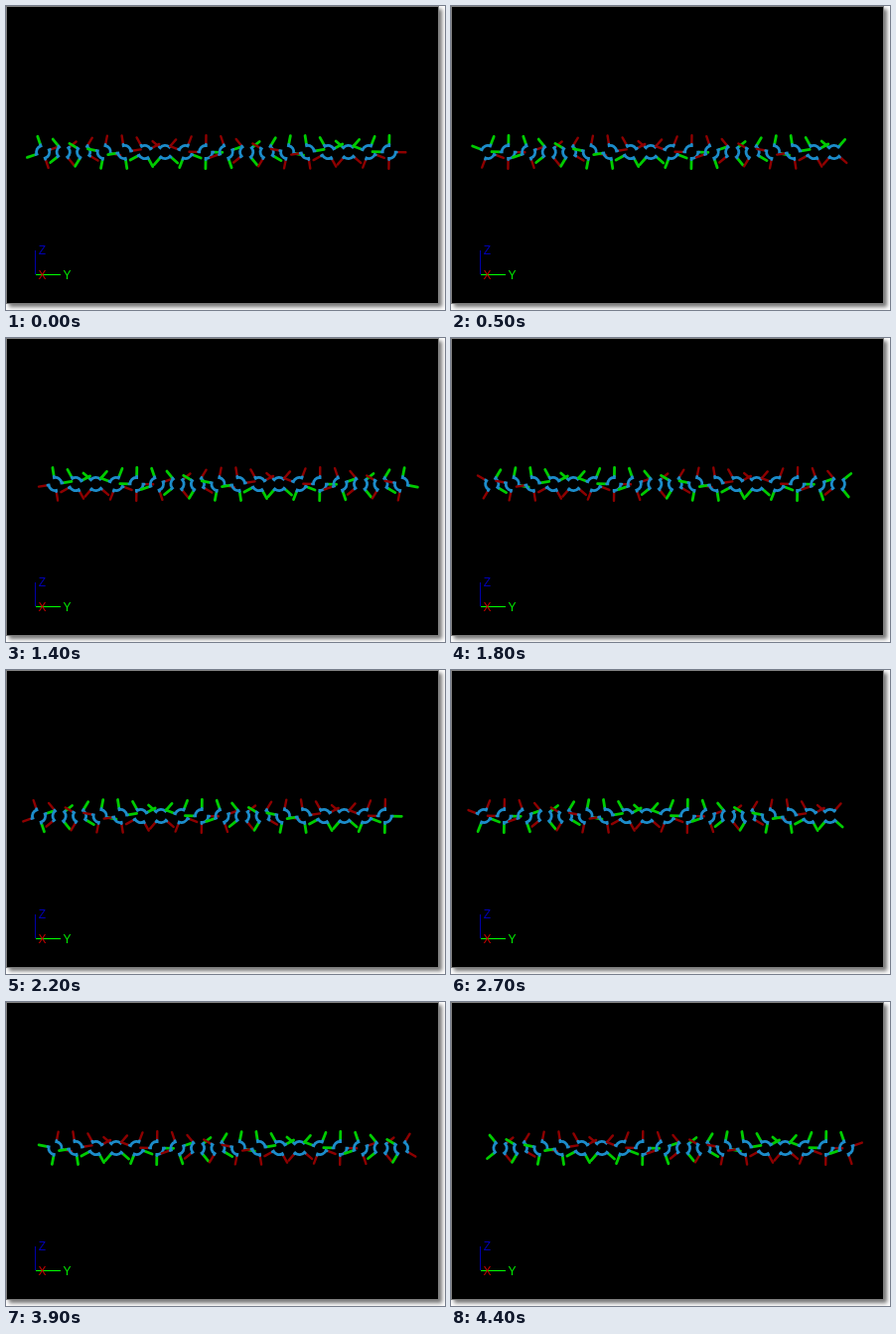
Write an HTML page that moves like this. It is 442 by 306 pixels and loops after 4500 ms.

```html
<!DOCTYPE html>
<html lang="en">
<head>
<meta charset="utf-8">
<title>Travelling rotors</title>
<style>
  html, body { margin: 0; width: 100%; height: 100%; overflow: hidden; background: #fff; }
  #panel {
    position: absolute; left: 0; top: 0; width: 436px; height: 300px; box-sizing: border-box;
    background: #000; border: 1px solid #808080; box-shadow: 3px 3px 4px rgba(0, 0, 0, .55);
  }
  svg { position: absolute; left: 0; top: 0; }
  text { font: 12px "Liberation Sans", Arial, sans-serif; text-anchor: middle; }
</style>
</head>
<body>
<div id="panel"></div>
<svg width="442" height="306" viewBox="0 0 442 306">
  <defs>
    <!-- A split ring with four arms; the green half faces +x -->
    <g id="rotor" fill="none" stroke-linecap="round">
      <path d="M-11.8 -11.8L-5.4 -5.4M-11.8 11.8L-5.4 5.4" stroke="#8e0000" stroke-width="2.4"/>
      <path d="M11.8 -11.8L5.4 -5.4M11.8 11.8L5.4 5.4" stroke="#00cc00" stroke-width="2.8"/>
      <path d="M5.4 -5.4L4.6 -4.6A6.2 6.2 0 0 1 4.6 4.6L5.4 5.4M-5.4 -5.4L-4.6 -4.6A6.2 6.2 0 0 0 -4.6 4.6L-5.4 5.4"
        stroke="#1c8cca" stroke-width="2.8"/>
    </g>
  </defs>
  <g id="chain"></g>
  <g shape-rendering="crispEdges" fill="none">
    <path d="M29.5 246V270" stroke="#0000a8"/>
    <path d="M30 270.5H55" stroke="#00ff00"/>
  </g>
  <text x="36.5" y="250" fill="#0000b4">Z</text>
  <text x="36.5" y="275" fill="#c80000">X</text>
  <text x="61.5" y="275" fill="#00f000">Y</text>
</svg>
<script>
const COUNT = 18, PITCH = 20.5, TWIST = 20;
const START_X = 37.2, AXIS_Y = 147, START_ANGLE = 206;
const STEP_MS = 100, STEPS = 45, PITCHES_PER_STEP = 0.4;

const chain = document.getElementById('chain');
const rotors = Array.from({ length: COUNT }, () => {
  const use = document.createElementNS('http://www.w3.org/2000/svg', 'use');
  use.setAttribute('href', '#rotor');
  return chain.appendChild(use);
});

// The row slides right; a rotor leaving at the end makes room for one at the start.
function draw(ms) {
  const step = Math.floor(ms / STEP_MS) % STEPS;
  const travel = step * PITCHES_PER_STEP;
  const entered = Math.floor(travel + 0.3);
  rotors.forEach((rotor, i) => {
    const x = START_X + PITCH * (travel - entered + i);
    const angle = START_ANGLE + TWIST * (entered - i);
    rotor.setAttribute('transform', `translate(${x.toFixed(2)} ${AXIS_Y}) rotate(${angle})`);
  });
}

const begin = performance.now();
function tick() {
  draw(performance.now() - begin);
  requestAnimationFrame(tick);
}
tick();
</script>
</body>
</html>
```
